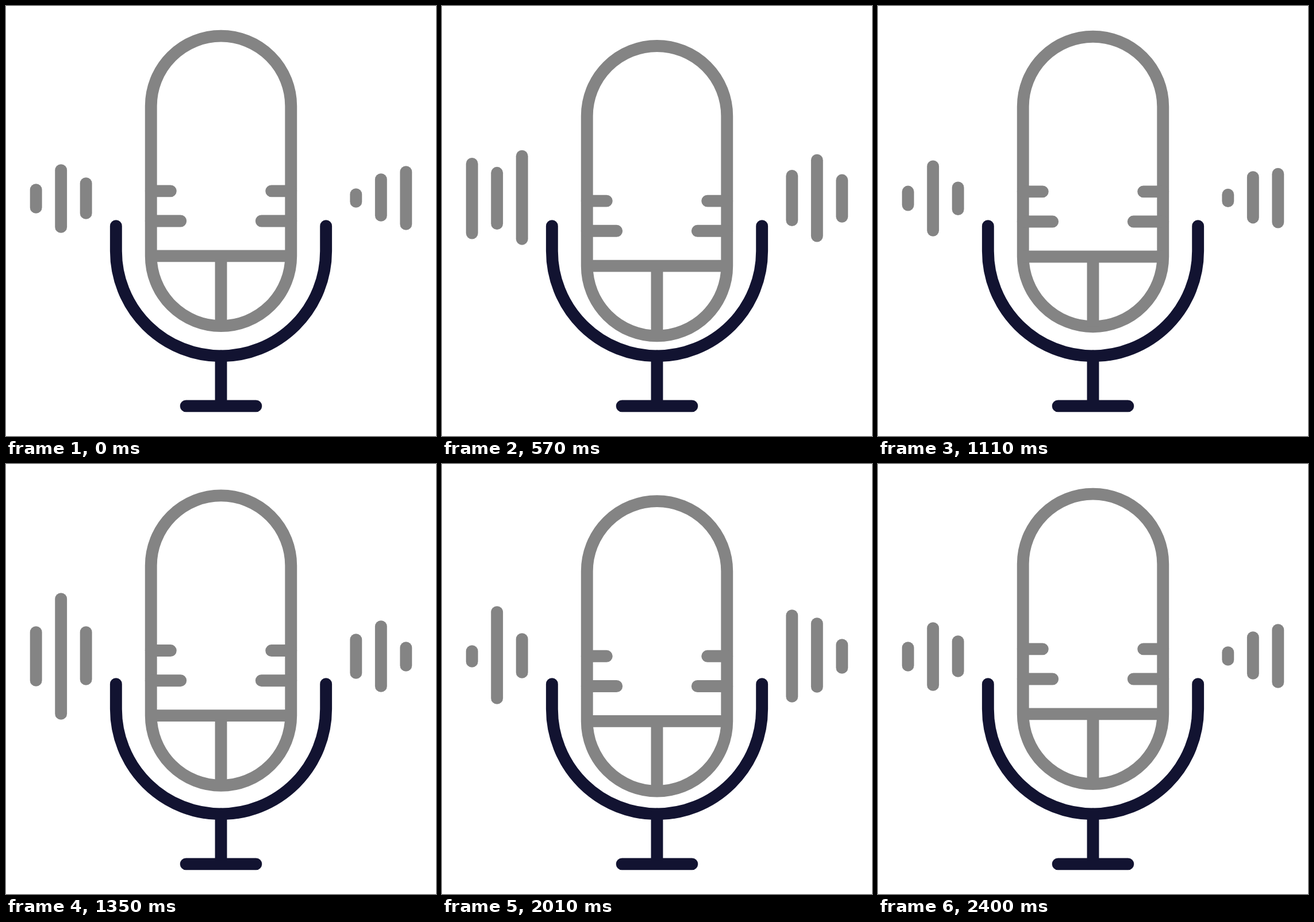
An HTML page that plays this animation: 748 by 748 pixels, repeating every 2430 ms.

```html
<!DOCTYPE html>
<html lang="en">
<head>
<meta charset="utf-8">
<title>Microphone</title>
<style>
  html, body { margin: 0; width: 100%; height: 100%; overflow: hidden; background: #fff; }
  svg { display: block; width: 100%; height: 100%; }
  g { fill: none; stroke-width: 12; }
  .grey { stroke: #848484; }
  .navy { stroke: #121331; stroke-linecap: round; }
  .round { stroke-linecap: round; }
</style>
</head>
<body>
<svg viewBox="0 0 430 430">
  <g class="grey" id="mic">
    <rect x="145" y="30" width="140" height="290" rx="70"/>
    <path d="M145 250H285M215 250V320"/>
    <path class="round" d="M145 185H164.6M145 215H174.6M285 185H265.4M285 215H255.4"/>
  </g>
  <g class="navy">
    <path d="M110 220V245A105 105 0 0 0 320 245V220"/>
    <path d="M215 350V400M180 400H250"/>
  </g>
  <g class="grey round" id="bars"></g>
</svg>
<script>
const LOOP = 2430, STEP = 30, CYCLE = 1200;
const UNIT = 748 / 430, CAP = 10.6;
const times = [0, 150, 300, 450, 810, 870];

// Each bar: x in icon units, then its top and bottom edges in stage pixels at each time.
const bars = [
  { x: 30,  top: [309, 282, 294, 253, 315, 307], bottom: [361, 387, 376, 416, 354, 360] },
  { x: 55,  top: [275, 224, 235, 268, 247, 222], bottom: [395, 445, 434, 402, 418, 443] },
  { x: 80,  top: [298, 282, 299, 254, 294, 304], bottom: [371, 385, 369, 413, 373, 364] },
  { x: 350, top: [317, 295, 289, 304, 253, 274], bottom: [351, 374, 379, 364, 415, 394] },
  { x: 375, top: [291, 272, 226, 244, 267, 261], bottom: [375, 397, 444, 426, 398, 405] },
  { x: 400, top: [278, 309, 289, 292, 304, 314], bottom: [390, 361, 381, 378, 365, 356] }
];

const mic = document.getElementById('mic');
const barGroup = document.getElementById('bars');
for (const bar of bars) {
  bar.line = document.createElementNS('http://www.w3.org/2000/svg', 'path');
  barGroup.append(bar.line);
}

const ease = s => s * s * (3 - 2 * s);

// Time and value of key i, wrapping round the cycle.
function key(values, i) {
  const n = times.length, k = (i + n) % n;
  return [times[k] + Math.floor(i / n) * CYCLE, values[k]];
}

function slope(values, i) {
  const [t0, v0] = key(values, i - 1);
  const [t1, v1] = key(values, i);
  const [t2, v2] = key(values, i + 1);
  const a = t1 - t0, b = t2 - t1;
  return ((v1 - v0) / a * b + (v2 - v1) / b * a) / (a + b);
}

// Smooth periodic curve through the keys.
function curve(values, t) {
  let i = times.length - 1;
  while (times[i] > t) i--;
  const [t0, v0] = key(values, i);
  const [t1, v1] = key(values, i + 1);
  const h = t1 - t0, s = (t - t0) / h, r = 1 - s;
  return v0 + (v1 - v0) * ease(s)
    + h * s * r * (r * slope(values, i) - s * slope(values, i + 1));
}

function draw(time) {
  const t = Math.floor(time % LOOP / STEP) * STEP % CYCLE;
  const half = CYCLE / 2;
  const dip = 10 * ease(1 - Math.abs(t - half) / half);
  mic.setAttribute('transform', `translate(0 ${dip.toFixed(3)})`);
  for (const { x, top, bottom, line } of bars) {
    const y0 = (curve(top, t) + CAP) / UNIT;
    const y1 = (curve(bottom, t) - CAP) / UNIT;
    line.setAttribute('d', `M${x} ${y0.toFixed(2)}V${Math.max(y0 + 0.5, y1).toFixed(2)}`);
  }
}

const start = performance.now();
function tick() {
  draw(performance.now() - start);
  requestAnimationFrame(tick);
}
tick();
</script>
</body>
</html>
```
